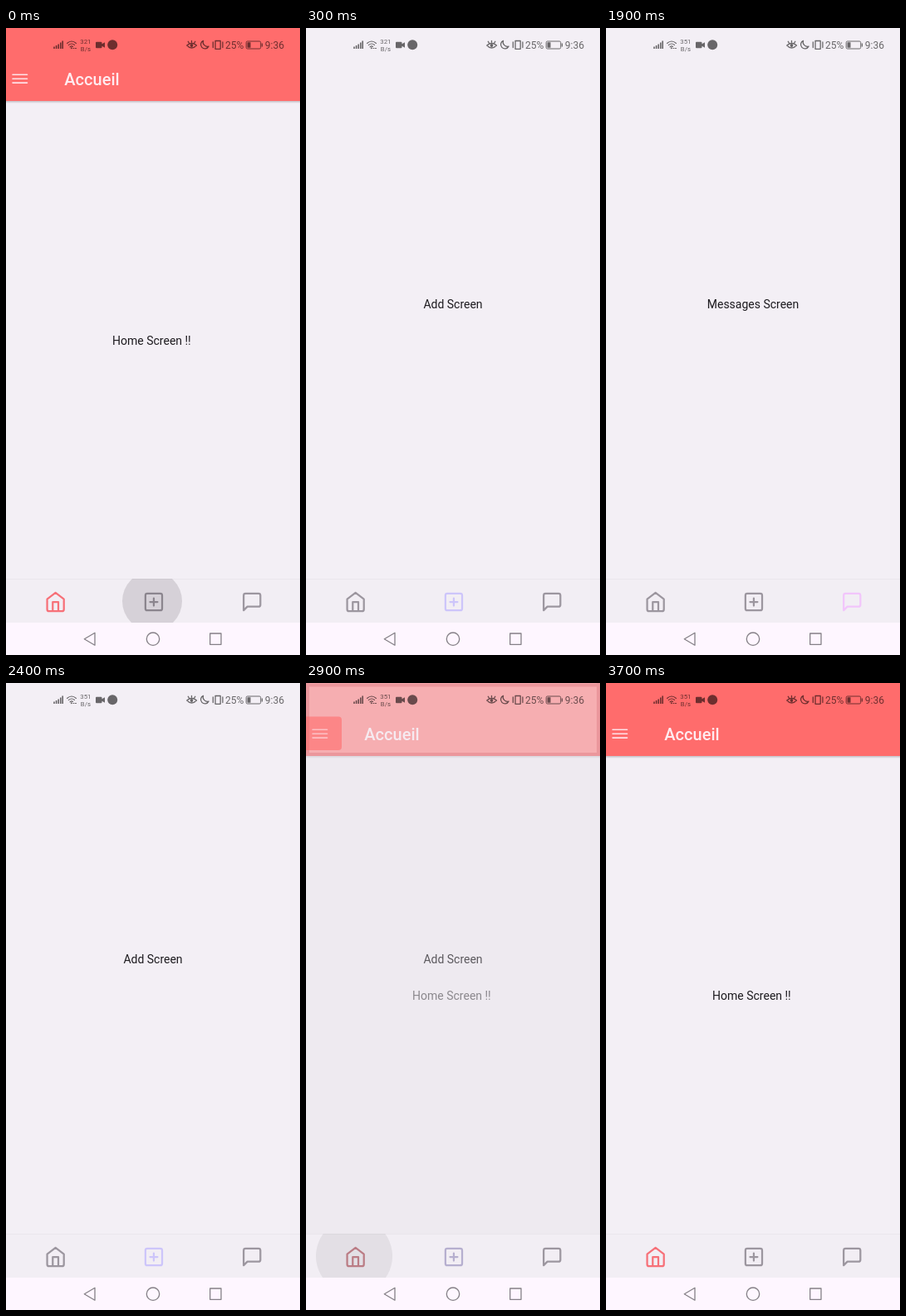
Write an HTML page that moves like this. It is 354 px wide and 756 px high and loops after 4.3 s.

```html
<!DOCTYPE html>
<html lang="fr">
<head>
<meta charset="utf-8">
<title>Tabs</title>
<style>
  html, body { margin: 0; width: 100%; height: 100%; overflow: hidden; background: #f3eff5; }
  svg { display: block; width: 100vw; height: 100vh; font-family: Roboto, sans-serif; }
  .line { fill: none; stroke-linecap: round; stroke-linejoin: round; }
</style>
</head>
<body>
<svg viewBox="0 0 354 756">
  <defs>
    <linearGradient id="drop" x2="0" y2="1">
      <stop stop-color="#000" stop-opacity=".2"/>
      <stop offset="1" stop-color="#000" stop-opacity="0"/>
    </linearGradient>
    <clipPath id="barClip"><rect y="664" width="354" height="53"/></clipPath>
  </defs>

  <rect width="354" height="756" fill="#f3eff5"/>
  <rect id="shade" width="354" height="664"/>

  <g id="header">
    <rect y="88" width="354" height="3" fill="url(#drop)"/>
    <rect width="354" height="88" fill="#ff6c6c"/>
    <g class="line" stroke="#ffe0e6" stroke-width="1.6">
      <path d="M8 56.3H25.5M8 61.2H25.5M8 66.1H25.5"/>
    </g>
    <text x="70.3" y="69" font-size="20" font-weight="500" fill="#ffebf0">Accueil</text>
  </g>
  <g id="edges">
    <path d="M2 0V86H352V0M0 2.5H354" fill="none" stroke="#d0606c" stroke-width="4" opacity=".3"/>
    <path d="M0 40.500H39a4 4 0 0 1 4 4V77a4 4 0 0 1-4 4H0Z" fill="#ff6c6c" opacity=".6"/>
    <path d="M8 56.300H25.500M8 61.200H25.500M8 66.100H25.500" class="line" stroke="#ffe0e6" stroke-width="1.600" opacity=".5"/>
  </g>

  <g font-size="14" text-anchor="middle" fill="#1d1b1f">
    <text class="label" x="175.4" y="382">Home Screen !!</text>
    <text class="label" x="177" y="338">Add Screen</text>
    <text class="label" x="177" y="338">Messages Screen</text>
  </g>

  <g id="status" opacity=".57">
    <path d="M58 25V22.500M60.600 25V21M63.200 25V19.500M65.800 25V17.500M68.200 25V15.500" stroke="#000" stroke-width="1.6"/>
    <g class="line" stroke="#000" stroke-width="1.1">
      <path d="M73.500 18.500Q79 13.500 84.500 18.500M75.300 20.700Q79 17.500 82.500 20.500M77 22.800Q79 21 80.500 22.500"/>
      <path d="M81 24.500h1M83.500 24.500h1"/>
    </g>
    <circle cx="78.8" cy="24.3" r="1"/>
    <text id="rate" x="95.9" y="19" font-size="7.8" text-anchor="middle"></text>
    <text x="95.9" y="28" font-size="7.8" text-anchor="middle">B/s</text>
    <path d="M109 16.800h5.500a1 1 0 0 1 1 1v1.400l3.500-1.900v6.400l-3.500-1.900v1.400a1 1 0 0 1-1 1H109a1 1 0 0 1-1-1v-5.400a1 1 0 0 1 1-1Z"/>
    <circle cx="128.2" cy="20.300" r="6"/>
    <g class="line" stroke="#000" stroke-width="1.300">
      <path d="M217.800 21Q223.500 15.500 229.500 21Q223.500 27 217.800 21ZM223.500 15.300v1.500M219.300 16.300l.9 1.400M227.800 16.300l-.9 1.400"/>
      <path d="M237.500 15.300a5 5 0 1 0 6.500 6.800a5.300 5.300 0 0 1-6.500-6.800Z"/>
      <path d="M252 15.500h6.200v9.800H252ZM249.300 17v6.500M260.900 17v6.500"/>
    </g>
    <circle cx="223.500" cy="21" r="1.900"/>
    <text x="264" y="24.700" font-size="12">25%</text>
    <rect x="289.200" y="16" width="17.500" height="9" rx="1.500" fill="none" stroke="#000"/>
    <path d="M290.500 17.300h4v6.400h-4ZM307.700 18.500h1.300v4h-1.300Z"/>
    <text x="311.800" y="24.700" font-size="12">9:36</text>
  </g>

  <rect y="664" width="354" height="53" fill="#f2eef4"/>
  <path d="M0 664.500H354" stroke="#eae6ec"/>
  <g class="line" stroke-width="2">
    <g class="icon" transform="translate(46.200 678.600) scale(1.120)">
      <path d="M3 9l9-7 9 7v11a2 2 0 0 1-2 2H5a2 2 0 0 1-2-2ZM9 22V12h6v10"/>
    </g>
    <g class="icon" transform="translate(164.500 678.600) scale(1.120)">
      <rect x="3" y="3" width="18" height="18" rx="2"/>
      <path d="M12 8v8M8 12h8"/>
    </g>
    <g class="icon" transform="translate(282.800 678.600) scale(1.120)">
      <path d="M21 15a2 2 0 0 1-2 2H7l-4 4V5a2 2 0 0 1 2-2h14a2 2 0 0 1 2 2Z"/>
    </g>
  </g>
  <g clip-path="url(#barClip)"><circle id="ripple" cy="691" fill="#1a101c"/></g>
  <circle id="touch" cy="693.500" r="11.300" fill="#fbf5ff" fill-opacity=".6" stroke="#d9d0ee" stroke-width="1.300"/>

  <rect y="717" width="354" height="39" fill="#fef6ff"/>
  <g class="line" stroke="#858087" stroke-width="1.300">
    <path d="M94.300 736.700L107 729.300V744.200Z"/>
    <circle cx="177" cy="736.700" r="7.700"/>
    <rect x="245.700" y="730" width="13.300" height="13.300"/>
  </g>
</svg>
<script>
const $ = id => document.getElementById(id);
const labels = document.querySelectorAll('.label');
const icons = document.querySelectorAll('.icon');

const LOOP = 4300, STEP = 100;
const GRAY = [156, 150, 159];
const ACTIVE = [[247, 112, 120], [205, 197, 250], [242, 197, 251]];
const TAB_X = [58, 176, 296];

// Each tap opens a tab; the switch is sampled in steps.
const TAPS = [
  { at: 0, from: 0, to: 1 },
  { at: 13, from: 1, to: 2 },
  { at: 21, from: 2, to: 1 },
  { at: 27, from: 1, to: 0 }
];
const FADE = [0, .12, .47, 1];
const RADIUS = [36, 44, 46];
const RIPPLE = [.13, .1, .065];
const TOUCHES = [
  { start: 11, end: 13, x: 302 },
  { start: 20, end: 21, x: 180 }
];

const set = (el, attrs) => {
  for (const name in attrs) el.setAttribute(name, attrs[name]);
};
const blend = (a, b, m) => `rgb(${a.map((v, i) => Math.round(v + (b[i] - v) * m))})`;

function draw(ms) {
  const step = Math.floor(ms % LOOP / STEP);
  const { at, from, to } = TAPS.filter(tap => tap.at <= step).pop();
  const n = Math.min(step - at, 3);
  const mix = FADE[n];
  const moving = mix > 0 && mix < 1;
  const share = i => i === to ? mix : i === from ? 1 - mix : 0;

  labels.forEach((el, i) => {
    const leaving = mix < 1 ? 1 - .64 * mix : 0;
    set(el, { opacity: i === to ? mix : i === from ? leaving : 0 });
  });
  icons.forEach((el, i) => set(el, { stroke: blend(GRAY, ACTIVE[i], share(i)) }));

  set($('header'), { opacity: share(0) });
  set($('edges'), { opacity: to === 0 && moving ? Math.min(1, mix * 2.1) : 0 });
  set($('shade'), { opacity: moving && share(0) ? .02 : 0 });
  set($('ripple'), { cx: TAB_X[to], r: RADIUS[n] || 0, opacity: RIPPLE[n] || 0 });

  const touch = TOUCHES.find(p => step >= p.start && step < p.end);
  set($('touch'), { cx: touch ? touch.x : 0, opacity: touch ? 1 : 0 });
  $('rate').textContent = step < 19 ? '321' : '351';
}

const start = performance.now();
function tick() {
  draw(performance.now() - start);
  requestAnimationFrame(tick);
}
tick();
</script>
</body>
</html>
```
